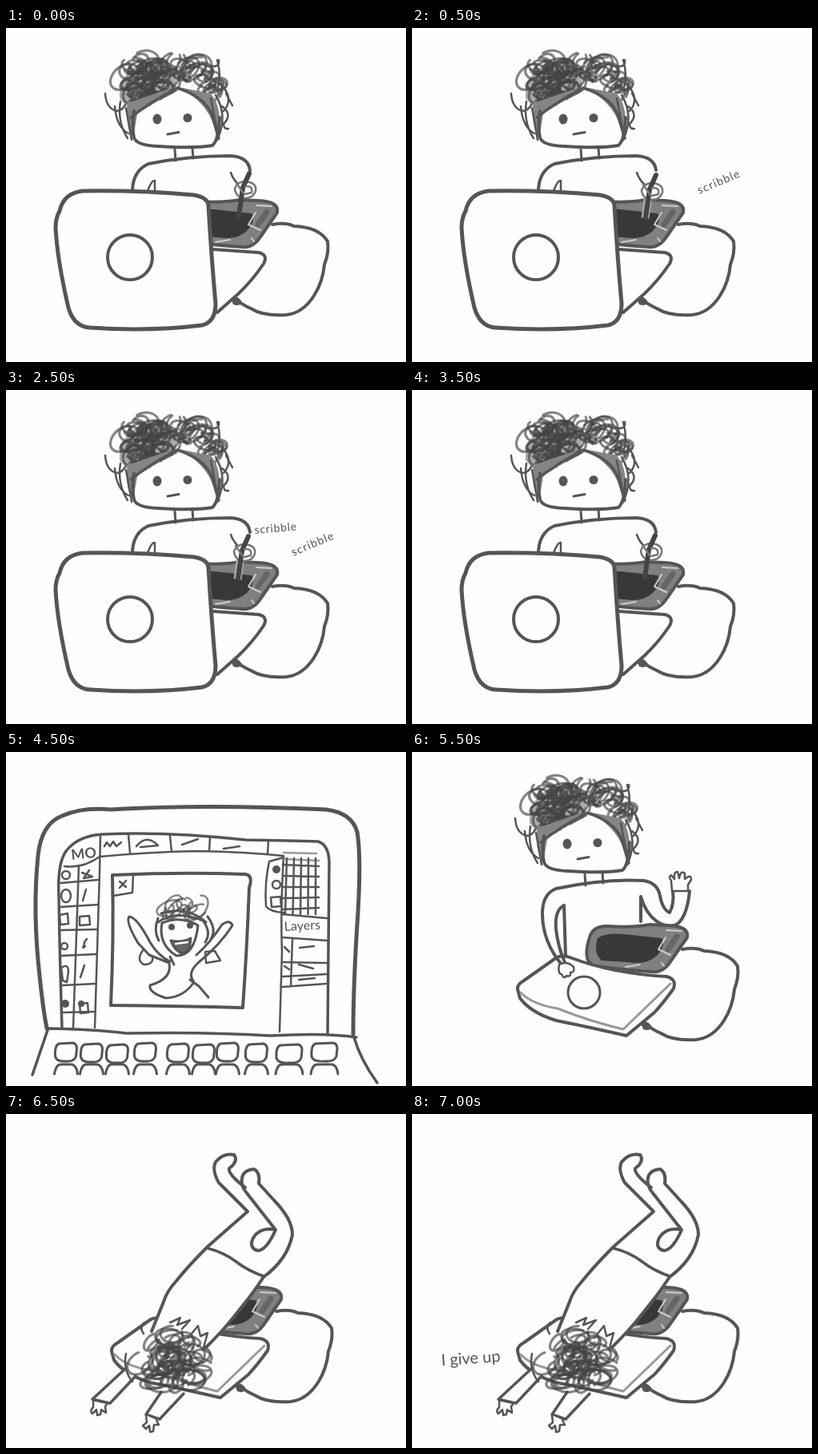
An HTML page for the animation above (7500 ms loop, 500 px wide and 418 px high).

```html
<!DOCTYPE html>
<html lang="en">
<head>
<meta charset="utf-8">
<style>
html, body { margin: 0; width: 100%; height: 100%; overflow: hidden; background: #fefefe; }
svg { display: block; width: 500px; height: 418px; }
#stage { fill: none; stroke: #555; stroke-width: 4; stroke-linecap: round; stroke-linejoin: round; }
text { fill: #555; stroke: none; font-family: Lato, "Open Sans", sans-serif; }
.paper { fill: #fefefe; }
.ink { fill: #555; stroke: none; }
.thin { stroke-width: 2.5; }
.pale { stroke: #999; }
</style>
</head>
<body>
<svg viewBox="0 0 500 418">
<defs>
  <g id="head">
    <path fill="#aaa" stroke="none" d="M142 88Q140 60 165 46Q200 34 212 60L212 80L160 108Z"/>
    <g id="hair"></g>
    <path class="paper" stroke="none" d="M158 110L212 80Q250 88 264 114L264 140Q260 148 235 149L180 148Q162 146 160 138Z"/>
    <path fill="#858585" stroke="none" d="M152 94L210 74Q180 94 164 108L159 138Q148 120 152 94M216 74L256 82Q272 100 265 143L260 122Q250 92 216 74"/>
    <path d="M160 104Q157 126 160 137Q163 147 190 148Q235 151 258 147Q266 140 267 112"/>
    <path d="M214 75Q178 94 156 112M214 75Q248 86 257 108L266 138" stroke-width="3.5"/>
    <path class="thin" d="M124 82Q125 100 138 104Q146 103 149 96M136 98Q138 124 153 132M143 92Q139 118 152 138M150 100L157 140M264 40Q270 62 264 78M268 70Q286 88 272 104M275 82L283 97M270 98Q284 108 272 120Q272 127 278 126M262 84Q278 110 264 140M256 88L264 130M248 46Q268 52 266 40"/>
    <ellipse class="ink" cx="189" cy="114" rx="5.5" ry="6.5"/>
    <ellipse class="ink" cx="227" cy="112.5" rx="5.5" ry="5.5"/>
    <path d="M202 133L216 130.500M211 152L212 166M233 150L234 163" stroke-width="3"/>
  </g>

  <g id="tablet">
    <path fill="#808080" d="M217 231Q221 216 240 217Q270 219 292 215L315 216Q342 217 339 231L319 260Q309 276 295 274Q250 271 221 266Q208 259 217 231Z"/>
    <path fill="#383838" stroke="none" d="M227 232Q238 225 260 227L307 232Q313 240 301 254Q288 266 265 262L232 260Q221 250 227 232Z"/>
    <path stroke="#ccc" stroke-width="2" d="M312 231L303 246L318 253M313 222L332 223M262 268L280 265M307 263L310 267"/>
    <path stroke="#666" stroke-width="7" d="M326 230L315 246"/>
  </g>

  <g id="cable">
    <path d="M333 246Q349 243 360 248Q391 249 402 267Q404 281 398 296Q396 318 385 335Q371 357 350 359Q322 361 306 351Q297 347 292 343"/>
    <path class="ink" d="M280 336Q290 334 295 343Q292 349 284 346Z"/>
  </g>

  <g id="slab">
    <path class="paper" d="M132 297Q131 291 140 286L181 257Q189 253 200 258Q250 277 318 281Q331 284 327 296Q315 313 303 326L268 355Q220 344 180 336Q148 326 135 308Z"/>
    <path class="pale" d="M136 301Q150 316 182 321Q222 337 264 347Q290 322 323 290" stroke-width="3"/>
  </g>

  <path id="palm" class="paper" stroke-width="2.5" d="M-11 11L-12 -2Q-16 -7 -12 -9L-8 -4Q-9 -14 -4 -13L-2 -5Q0 -16 5 -11L5 -4Q13 -11 13 -3L9 3L9 11Z"/>
</defs>

<g id="stage">
  <!-- working -->
  <g data-on="0-4500">
    <use href="#head"/>
    <path d="M158 205Q158 179 178 170Q228 160 280 160Q303 161 305 178"/>
    <path class="thin" d="M177 204Q182 190 186 191L186 204M281 181Q284 190 291 196"/>
    <use href="#tablet"/>
    <use href="#cable"/>
    <g id="hand">
      <path id="glow" stroke="#aaa" stroke-width="10" stroke-linecap="butt" d="M294 211L290.500 236"/>
      <path class="thin paper" stroke="#777" d="M286 201Q289 192 300 192Q314 194 312 204Q309 213 298 213Q287 212 286 201Z"/>
      <path stroke="#444" stroke-width="6" d="M304 182L296 200L291 235"/>
      <path class="thin" stroke="#777" d="M288 194L297 207M299 198Q309 197 307 206L299 208"/>
    </g>
    <path class="paper" d="M259 277L316 281Q328 284 322 295Q308 316 290 333L264 356"/>
    <path class="paper" stroke-width="5" d="M67 229Q72 207 95 204Q170 203 235 209Q252 212 253 222Q257 290 262 345Q262 368 245 372Q180 380 105 375Q85 374 78 350Q64 290 62 250Q62 238 67 229Z"/>
    <circle cx="155" cy="287" r="28"/>
    <text data-on="1000-3500" transform="translate(311 180) rotate(-5)" font-size="14" letter-spacing=".7">scribble</text>
    <text data-on="500-3500" transform="translate(359 208) rotate(-23)" font-size="14" letter-spacing="1.2">scribble</text>
  </g>

  <!-- the screen -->
  <g data-on="4500-5500">
    <path stroke-width="5" d="M51 346Q46 320 42 280Q33 200 40 130Q44 90 70 80Q95 69 130 72Q250 65 400 72Q432 76 439 100Q444 130 440 200Q434 290 434 353"/>
    <path d="M51 346Q110 347 150 352Q250 350 330 355Q400 351 438 357M52 348L33 404M435 357Q443 385 464 414" stroke-width="3.5"/>
    <path d="M70 345Q67 250 66 180Q64 140 75 124Q90 105 120 103Q200 99 300 110Q360 111 390 112Q404 116 404 140L402 352" stroke-width="3.5"/>
    <g class="thin">
      <path d="M73 143Q96 146 117 131Q180 125 240 124Q300 125 347 130Q343 200 345 250L342 350M118 104L117 150L111 345M91 142L84 345M153 104L155 126M205 105L207 125M255 107L254 124M328 111L327 127"/>
      <path d="M68 164L115 160M67 194L115 191M67 223L113 222M69 255L113 253M70 292L112 290M70 326L110 325"/>
      <path d="M123 118L126 113L130 118L134 112L138 118L144 113M163 118Q176 102 190 117L168 119M220 116L240 109M272 121L292 118"/>
      <path class="pale" d="M348 134L391 136M347 126L388 127"/>
    </g>
    <text transform="translate(82 135) rotate(-6)" font-size="18" font-weight="700">MO</text>
    <g class="thin">
      <circle cx="75" cy="154" r="5"/><path d="M95 151L108 156L97 158L104 148"/>
      <ellipse cx="75" cy="180" rx="6" ry="8"/><path d="M100 172L96 186"/>
      <path d="M67 204L77 202L78 215L68 216ZM92 206L104 205L105 216L92 217Z"/>
      <circle cx="73" cy="243" r="4"/><path d="M97 245L98 238L101 234M96 244L99 243"/>
      <path d="M69 270Q78 264 78 275L76 288L71 286ZM98 267L93 282"/>
      <circle class="ink" cx="74" cy="315" r="5"/><path d="M92 315L102 314L103 326L93 327Z"/><circle class="ink" cx="94" cy="315" r="4"/>
    </g>
    <path d="M133 154Q220 150 300 153Q309 155 304 170Q301 250 296 320Q220 318 131 317Q135 230 133 154Z"/>
    <path class="thin" d="M134 180L158 176L159 154M142 162L150 169M150 161L142 170"/>
    <g id="curls"></g>
    <g stroke-width="3">
      <path class="paper" d="M195 214Q190 241 213 255Q236 255 240 217Q218 204 195 214"/>
      <path d="M190 213Q212 197 246 211M194 202Q226 192 250 213M190 208Q184 224 191 236M244 208Q258 225 249 238M252 206Q264 222 256 234"/>
      <circle class="ink" cx="207" cy="219" r="4"/><circle class="ink" cx="230" cy="217" r="4"/>
      <path fill="#666" d="M206 236Q220 239 231 233Q230 251 221 252Q211 250 206 236Z"/>
      <path d="M212 240L227 238" stroke="#fefefe" stroke-width="2.5"/>
      <path d="M205 262Q190 255 180 238Q164 207 154 206Q149 212 165 239L179 254L204 264Q208 284 180 292Q178 301 200 308Q222 307 235 288Q226 277 240 264Q268 241 283 217Q280 209 270 216Q255 239 238 254M205 256L210 266M230 285L241 293L253 307"/>
      <path class="thin" d="M172 247Q162 260 172 266Q185 266 183 256M249 250L261 249L268 261L250 264Z"/>
    </g>
    <g class="thin">
      <path d="M347 132L329 137Q323 165 325 193Q330 200 347 201"/>
      <circle class="ink" cx="338" cy="147" r="5"/><circle cx="338" cy="166" r="5"/>
      <path d="M331 182L343 181L344 193L332 194Z"/>
      <path id="grid"/>
      <path d="M345 203L401 208M345 232L402 236M345 263L401 264M345 294L400 290M358 234L356 293M346 281L401 278M367 245L385 243M366 266L384 271M366 285L386 283M348 244L354 250M348 268L354 272"/>
    </g>
    <text transform="translate(348 224) rotate(-3)" font-size="16">Layers</text>
    <g id="keys" stroke-width="3"></g>
  </g>

  <!-- lid closed -->
  <g data-on="5500-6500">
    <use href="#head" x="5" y="1"/>
    <path d="M180 171Q240 158 290 161Q307 164 310 180Q313 197 322 201Q328 190 326 174M347 174Q344 205 332 215Q320 222 306 212Q292 202 286 181L286 212M190 192L192 256"/>
    <use href="#tablet" x="5" y="1"/>
    <use href="#cable" x="5" y="1"/>
    <use href="#slab"/>
    <circle cx="215" cy="301" r="20" stroke-width="3"/>
    <use href="#palm" x="336" y="163"/>
    <g data-on="5500-6000">
      <path d="M187 266Q164 238 163 205Q162 178 180 171M190 192Q178 198 180 222Q183 246 191 263"/>
      <path class="paper thin" d="M184 266Q194 261 202 269Q204 276 198 276Q199 282 193 280Q190 285 187 278Q182 278 184 266Z"/>
    </g>
    <g data-on="6000-6500">
      <path d="M122 198Q121 231 136 237Q156 241 169 226Q184 208 190 192M146 198Q147 212 154 214Q161 205 164 191Q168 172 182 171"/>
      <use href="#palm" x="133" y="189"/>
    </g>
  </g>

  <!-- collapsed -->
  <g data-on="6500-7500">
    <use href="#tablet" x="5" y="1"/>
    <use href="#cable" x="5" y="1"/>
    <use href="#slab"/>
    <path class="paper" stroke="none" d="M182 272L198 234L212 210L252 166L303 122L334 108Q358 130 358 150Q352 180 322 204L252 292Z"/>
    <path d="M182 272L197 235Q201 222 212 210Q228 190 252 166L302 122L266 86Q257 70 262 60Q272 48 285 51Q291 59 279 68Q277 75 299 92M250 292Q288 255 322 204Q352 182 358 151Q358 132 336 109L316 87Q318 73 310 69Q297 70 295 80Q293 90 301 99L337 145Q326 170 315 171Q303 168 309 155Q318 141 337 145"/>
    <path d="M252 168Q272 173 288 185Q302 196 322 203" stroke-width="3.5"/>
    <path class="paper" stroke-width="3.5" d="M150 318L108 357L130 362L162 328M194 348L175 376L192 382L222 350"/>
    <path class="paper thin" d="M109 358L109 367Q104 372 108 375L113 370L114 377L118 376L119 370L125 374L124 366L127 362ZM175 377L176 386L171 390L175 394L179 390L180 398L184 397L185 389L191 389L188 383"/>
    <g id="heap"></g>
    <path class="thin" d="M172 275Q166 266 173 261M205 261L218 255L214 264L230 258L220 269M228 280L240 265L243 278L252 274L247 292M150 300Q146 320 158 335"/>
    <text data-on="7000-7500" transform="translate(37 315) rotate(-4)" font-size="20">I give up</text>
  </g>
</g>
</svg>

<script>
const $ = id => document.getElementById(id);

function add(parent, tag, attrs) {
  const el = document.createElementNS('http://www.w3.org/2000/svg', tag);
  for (const [key, value] of Object.entries(attrs)) el.setAttribute(key, value);
  parent.append(el);
}

function seeded(seed) {
  return () => (seed = seed * 16807 % 2147483647) / 2147483647;
}

// Overlapping open marker loops spread over an ellipse
function scribble(id, count, cx, cy, rx, ry, size, seed, width = 3) {
  const rnd = seeded(seed * 7919);
  for (let i = 0; i < count; i++) {
    const angle = rnd() * Math.PI * 2, reach = Math.sqrt(rnd());
    const r = size * (.5 + rnd() * .5);
    const x = cx + Math.cos(angle) * reach * rx, y = cy + Math.sin(angle) * reach * ry;
    add($(id), 'ellipse', {
      rx: r, ry: r * (.45 + rnd() * .35), transform: `translate(${x} ${y}) rotate(${rnd() * 80 - 60})`,
      pathLength: 100, 'stroke-dasharray': '82 18', 'stroke-dashoffset': rnd() * 100,
      stroke: '#444', 'stroke-opacity': .65, 'stroke-width': width
    });
  }
}

scribble('hair', 38, 177, 67, 30, 25, 21, 911, 3.2);
scribble('hair', 13, 218, 52, 26, 13, 21, 3307);
scribble('hair', 10, 255, 70, 11, 18, 17, 5279);
scribble('curls', 9, 220, 198, 25, 9, 17, 77, 2.5);
scribble('heap', 48, 207, 308, 41, 33, 19, 4099, 3.2);

let lines = '';
for (let i = 0; i < 5; i++) lines += `M${351 + i * 9} 133L${349 + i * 9.5} 203M346 ${141 + i * 14}L391 ${143 + i * 13}`;
$('grid').setAttribute('d', lines);

[75, 107, 139, 174, 215, 247, 277, 313, 354, 398].forEach((x, i) => {
  const w = i > 7 ? 16 : 13.5, y = 365 + i % 3;
  add($('keys'), 'path', { d: `M${x - w + 5} ${y}L${x + w - 5} ${y - 1}Q${x + w} ${y} ${x + w} ${y + 6}L${x + w - 1} ${y + 16}Q${x + w - 4} ${y + 23} ${x} ${y + 22}Q${x - w + 2} ${y + 23} ${x - w} ${y + 16}Q${x - w - 1} ${y + 2} ${x - w + 5} ${y}Z` });
  add($('keys'), 'path', { d: `M${x - w - 1} 403Q${x - w + 1} 391 ${x - w + 7} 391L${x + w - 6} 391Q${x + w} 393 ${x + w + 1} 403` });
});

const LOOP = 7500;
const REST = [0, 0], B = [1, 2], C = [-1, 1], D = [-1, 4];
const poses = [REST, B, C, D, B, C, B, REST, REST];
const timed = [...document.querySelectorAll('[data-on]')].map(el => [el, ...el.dataset.on.split('-').map(Number)]);

function draw(now) {
  const t = now % LOOP;
  for (const [el, from, to] of timed) el.style.display = t >= from && t < to ? '' : 'none';
  const pose = poses[Math.floor(t / 500)] || REST;
  $('hand').setAttribute('transform', `translate(${pose})`);
  $('glow').style.display = pose === REST ? 'none' : '';
}

const start = performance.now();
function tick() {
  draw(performance.now() - start);
  requestAnimationFrame(tick);
}
tick();
</script>
</body>
</html>
```
